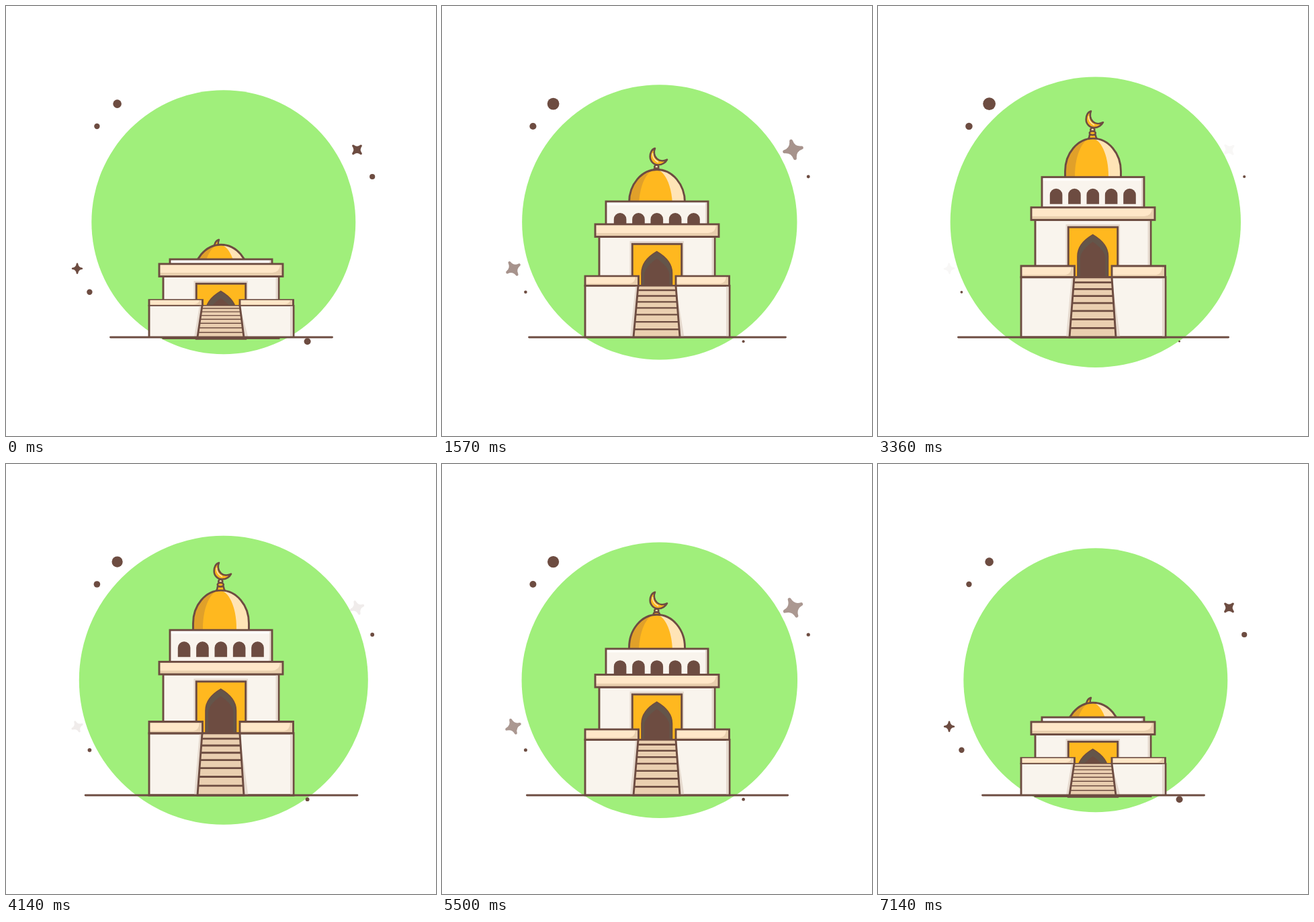
These frames come from a looping animation (640x640 px, 7.21 s). An HTML page:

```html
<!DOCTYPE html>
<html lang="en">
<head>
<meta charset="utf-8">
<title>Domed building</title>
<style>
  html, body { margin: 0; width: 100%; height: 100%; overflow: hidden; background: #fff; }
  svg { display: block; width: 100%; height: 100%; }
  .ink { stroke: #6d4c41; stroke-width: 2.9; }
  .brown { fill: #6d4c41; }
  .wall { fill: #f9f4ed; }
  .shade { fill: #e6dacf; }
  .cap { fill: #ffe7c8; }
  .capShade { fill: #e9cfae; }
  .gold { fill: #ffb81f; }
  .none { fill: none; }
</style>
</head>
<body>
<svg viewBox="0 0 640 640">
  <defs>
    <path id="star" d="M0-.84Q.09-.09 .84 0Q.09 .09 0 .84Q-.09 .09-.84 0Q-.09-.09 0-.84Z"
      fill="#6d4c41" stroke="#6d4c41" stroke-width=".32" stroke-linejoin="round"/>
    <path id="domeShape" d="M278.5 64V49A41.5 49 0 0 1 361.5 49V64Z"/>
    <clipPath id="domeClip"><use href="#domeShape"/></clipPath>
  </defs>

  <circle id="disc" cx="323.8" cy="321.8" fill="#a0ef7b"/>
  <g id="dots" class="brown"></g>
  <use id="starL" href="#star"/>
  <use id="starR" href="#star"/>

  <g id="finial" class="ink" stroke-linejoin="round" style="stroke-width:2.6">
    <path class="gold" d="M315 36H323.6Q324 40 327 44H312Q315 40 315 36Z"/>
    <circle fill="#ffe3b3" cx="319.3" cy="28.5" r="3"/>
    <ellipse class="gold" cx="319.3" cy="33.4" rx="4.5" ry="2.9"/>
    <path class="gold" d="M317 .8C312 2 309.7 8 309.7 13C309.7 20 315 25.4 322 25.4C328 25.4 333 21.5 335 17.5C330 20 324 20 320 16.5C315 12 315 5 317 .8Z"/>
    <path d="M313.5 8Q313 17 322 21.6" fill="none" stroke="#ffe3b3" stroke-width="1.5"/>
  </g>

  <g id="dome">
    <g clip-path="url(#domeClip)">
      <rect x="278" width="41" height="64" fill="#e0a02a"/>
      <rect x="318" width="44" height="64" fill="#ffe4b6"/>
      <path class="gold" d="M293 64V56C293 24 305 0 318 0S343 24 343 56V64Z"/>
    </g>
    <use href="#domeShape" class="ink none"/>
  </g>

  <g id="drum">
    <rect class="wall" x="244" width="152" height="60"/>
    <rect x="245" y="1" width="150" height="4.5" fill="#fffdfa"/>
    <path class="shade" d="M392 2H395V60H388Q392 46 392 38Z"/>
    <g id="windows" class="brown"></g>
    <rect class="ink none" x="244" width="152" height="60"/>
  </g>

  <g id="hall">
    <rect class="wall ink" x="234" width="172" height="92"/>
    <rect class="shade" x="401.5" y="1" width="3" height="90"/>
    <rect class="shade" x="279.5" y="6.5" width="80.5" height="85"/>
    <rect class="gold ink" x="283.3" y="10.8" width="73.4" height="82"/>
    <path d="M297 92V42C297 31 306 27 319.7 22C333 27 342.5 31 342.5 42V92Z" fill="#65564a" class="ink" style="display:none"/>
    <path d="M297 92V54C297 41 306 30 319.7 22C333.4 30 342.5 41 342.5 54V92Z" fill="#64554a" stroke="#6d4c41" stroke-width="1.6"/>
    <path class="brown" d="M301 92V58C301 48 309 40 319.7 32.5C330.4 40 338.5 48 338.5 58V92Z"/>
    <rect class="cap" x="228" y="-18.6" width="184" height="18.6"/>
    <path class="capShade" d="M411 -17V-1H229V-5.5H396Q407 -6 408 -17Z"/>
    <rect class="ink none" x="228" y="-18.6" width="184" height="18.6"/>
  </g>

  <!-- 100 units tall, stretched from the ground up -->
  <g id="base" style="stroke-width:2.8">
    <rect class="wall ink" x="213" y="-84.3" width="215" height="84.3"/>
    <path class="shade" d="M288 -84H292L285 0H280ZM348 -84L360.500 0H354ZM423 -84H426.500V0H423Z"/>
    <g id="steps" class="ink"></g>
    <g id="caps"></g>
  </g>

  <path id="ground" class="ink none" stroke-linecap="round"/>
</svg>

<script>
const $ = id => document.getElementById(id);
const LOOP = 7210, FRAMES = 101, GROUND = 493;
const KEYS = [0, 33, 66.6, 100];

const smooth = u => u * u * (3 - 2 * u);
const mix = (a, b, u) => a + (b - a) * u;

// Ease low -> mid -> high -> low across the three thirds of the loop
function stage(f, low, mid, high) {
  const v = [low, mid, high, low];
  const i = f < KEYS[1] ? 0 : f < KEYS[2] ? 1 : 2;
  return mix(v[i], v[i + 1], smooth((f - KEYS[i]) / (KEYS[i + 1] - KEYS[i])));
}

// Ease 0 -> 1 -> 0 with the given period
function pulse(f, period) {
  const u = (f % period) / period;
  return smooth(1 - Math.abs(2 * u - 1));
}

// x, y, radius at rest, radius at the pulse peak
const DOTS = [
  [165.6, 145.6, 6.3, 9.7],
  [135.4, 179, 4.2, 5.4],
  [545.2, 254, 4.1, 1.9],
  [124.4, 425.8, 4.2, 1.7],
  [448.6, 499.2, 5, 1.05]
];
$('dots').innerHTML = DOTS.map(([x, y]) => `<circle cx="${x}" cy="${y}"/>`).join('');

$('windows').innerHTML = [0, 1, 2, 3, 4].map(i =>
  `<path d="M${255.8 + 27.35 * i} 40V26.400a9.300 9.300 0 0 1 18.600 0V40Z"/>`).join('');

const RISE = [.153, .298, .438, .568, .686, .802, .912];
$('steps').innerHTML = '<path fill="#eacfb0" d="M292 -84.300H348L354 0H285Z"/>' +
  RISE.map(r => `<path d="M${285 + 7 * r} ${-84.3 * r}H${354 - 6 * r}" stroke-width="2.600"/>`).join('');

$('caps').innerHTML = [213, 348].map(x => `<g transform="translate(${x} -100)">
  <rect class="cap" width="79.500" height="15.700"/>
  <path class="capShade" d="M78 1V15H1V12.500H66Q74 12 75 1Z"/>
  <rect class="ink none" width="79.500" height="15.700"/></g>`).join('');

const lift = (id, y) => $(id).setAttribute('transform', `translate(0 ${y})`);

function star(id, x, y, angle, size, alpha) {
  $(id).setAttribute('transform', `translate(${x} ${y}) rotate(${angle}) scale(${size})`);
  $(id).setAttribute('opacity', alpha);
}

function draw(ms) {
  const f = Math.floor((ms % LOOP + 4) / LOOP * FRAMES) % FRAMES;
  const swell = pulse(f, 100), twinkle = pulse(f, 50), beat = pulse(f, 100 / 3);

  $('disc').setAttribute('r', mix(196.5, 216.4, swell));
  DOTS.forEach(([, , a, b], i) => $('dots').children[i].setAttribute('r', mix(a, b, beat)));

  const alpha = 1 - .97 * swell;
  star('starL', 106, 390.8, 360 * swell, mix(8.2, 12.6, twinkle), alpha);
  star('starR', 522.5, 213.9, 45 - 360 * swell, mix(9.8, 15.9, twinkle), alpha);

  lift('finial', stage(f, 347, 163.5, 142.8));
  lift('dome', stage(f, 355.2, 204.4, 185));
  lift('drum', stage(f, 377, 260.8, 244.5));
  lift('hall', stage(f, 402.5, 322.8, 311.1));
  $('base').setAttribute('transform', `translate(0 ${GROUND}) scale(1 ${stage(f, 56, 103.3, 110.6) / 100})`);

  const half = stage(f, 165, 200, 202.8);
  $('ground').setAttribute('d', `M${320.5 - half} ${GROUND}H${320.5 + half}`);
}

const start = performance.now();
function tick() {
  draw(performance.now() - start);
  requestAnimationFrame(tick);
}
tick();
</script>
</body>
</html>
```
